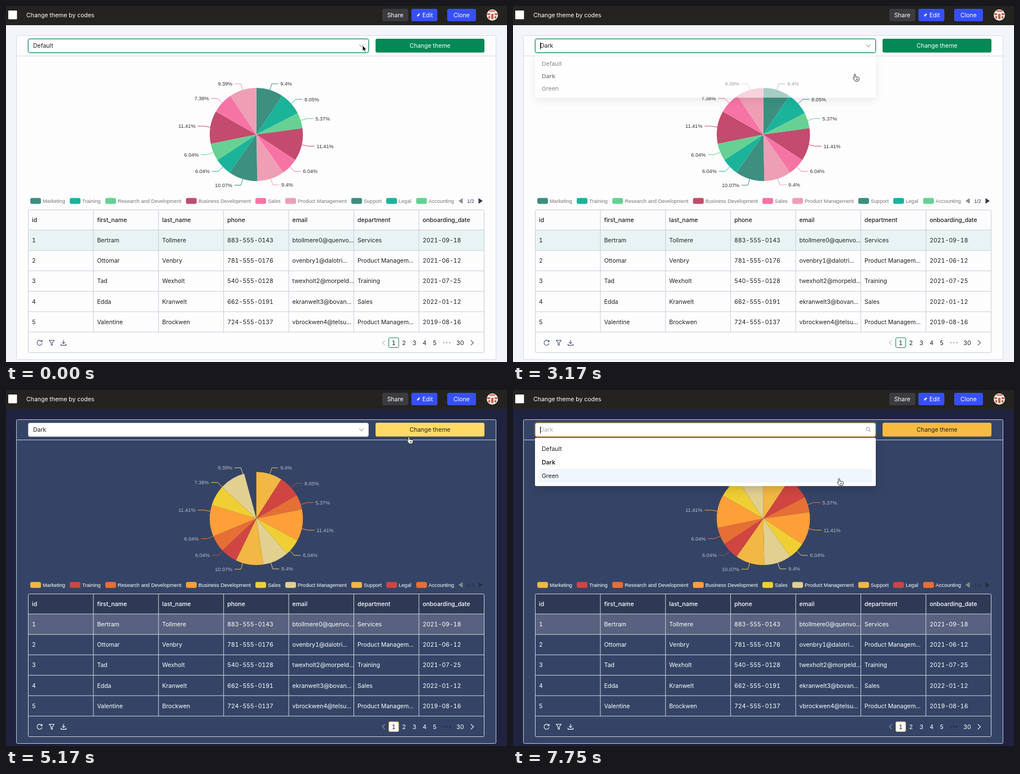
Animation, 888 px wide and 631 px high, one loop 8 s. Source, as an HTML page:

```html
<!DOCTYPE html>
<html lang="en">
<head>
<meta charset="utf-8">
<title>Change theme by codes</title>
<style>
  html, body { margin: 0; width: 100%; height: 100%; overflow: hidden; }
  svg {
    display: block; width: 100vw; height: 100vh;
    --page: #f4f5fb; --panel: #fdfdfe; --edge: #d6d9e9; --grid: #c9cddb; --ink: #222;
    --row: #e8f4f3; --icon: #4a5378; --legend: #777; --label: #333; --pager: #2f3a48;
    --accent: #078a5c; --prev: #c2c4cc; --dots: #a5a8b5;
    --c0: #3d8f7f; --c1: #1cb39b; --c2: #66d193; --c3: #c24b6e; --c4: #f674a5; --c5: #ee9fb5;
  }
  svg.dark {
    --page: #20233f; --panel: #354466; --edge: #c3c8d4; --grid: #cfd3dd; --ink: #fff;
    --row: #58617f; --icon: #fff; --legend: #fff; --label: #b7bbc7; --pager: #28303d;
    --accent: #f0b042; --prev: #878d9d; --dots: #1f2738;
    --c0: #f3b743; --c1: #d04541; --c2: #e66f35; --c3: #ff9f38; --c4: #f0cf34; --c5: #e2d091;
  }
  text { font: 10.5px Inter, sans-serif; font-variant-numeric: tabular-nums; fill: var(--ink); white-space: pre; }
  .chart text { font: 9.1px "Liberation Sans", Arial, sans-serif; fill: var(--label); }
  .chart.legend text { fill: var(--legend); }
  .mid { text-anchor: middle; }
  .end { text-anchor: end; }
  .medium { font-weight: 500; }
  .white { fill: #fff; }
  .black { fill: #222; }
  .line { fill: none; stroke: var(--grid); }
  .icon { fill: none; stroke: var(--icon); stroke-width: 1.1; stroke-linejoin: round; }
  #list rect:first-child { filter: drop-shadow(0 6px 8px rgba(0, 0, 0, .15)); }
</style>
</head>
<body>
<svg id="stage" viewBox="0 0 888 631" preserveAspectRatio="none"></svg>
<script>
const LOOP = 8000, STEP = 1000 / 12;
const PIE = { x: 443.7, y: 227.8, r: 82.5, arm: 11.4 };
const LIST = { top: 84.8, first: 91.7, row: 24.2 };
const shares = [9.4, 8.05, 5.37, 11.41, 6.04, 9.4, 10.07, 6.04, 6.04, 11.41, 7.38, 9.39];
const legend = [[43, 'Marketing'], [113, 'Training'], [176, 'Research and Development'],
  [319, 'Business Development'], [442, 'Sales'], [495, 'Product Management'],
  [612, 'Support'], [674, 'Legal'], [727, 'Accounting']];
const themes = ['Default', 'Dark', 'Green'];
const columns = ['id', 'first_name', 'last_name', 'phone', 'email', 'department', 'onboarding_date'];
const people = [
  ['1', 'Bertram', 'Tollmere', '883-555-0143', 'btollmere0@quenvo...', 'Services', '2021-09-18'],
  ['2', 'Ottomar', 'Venbry', '781-555-0176', 'ovenbry1@dalotri...', 'Product Managem...', '2021-06-12'],
  ['3', 'Tad', 'Wexholt', '540-555-0128', 'twexholt2@morpeld...', 'Training', '2021-07-25'],
  ['4', 'Edda', 'Kranwelt', '662-555-0191', 'ekranwelt3@bovan...', 'Sales', '2022-01-12'],
  ['5', 'Valentine', 'Brockwen', '724-555-0137', 'vbrockwen4@telsu...', 'Product Managem...', '2019-08-16'],
];

// Markup helpers; text is placed by its vertical centre
const text = (x, y, s, cls = '', id = '') => `<text x="${x}" y="${y + 3.8}" class="${cls}" id="${id}">${s}</text>`;
const small = (x, y, s, cls = '') => `<text x="${x}" y="${y + 3.2}" class="${cls}">${s}</text>`;
const rect = (x, y, w, h, fill, r = 0, more = '') =>
  `<rect x="${x}" y="${y}" width="${w}" height="${h}" rx="${r}" fill="${fill}" ${more}/>`;
const path = (d, cls = '', more = '') => `<path d="${d}" class="${cls}" ${more}/>`;
const polar = (turn, r) => [PIE.x + r * Math.sin(turn * 2 * Math.PI), PIE.y - r * Math.cos(turn * 2 * Math.PI)];
const color = i => `var(--c${i % 6})`;

let sum = 0;
const slices = shares.map(share => {
  const from = sum / 100;
  sum += share;
  return { share, from, to: sum / 100 };
});

function topBar() {
  return rect(0, 0, 888, 34, '#242320') + rect(4, 8, 15.5, 15.5, '#fff', 1) +
    text(36, 16, 'Change theme by codes', 'white') +
    rect(667, 5, 46, 22, '#3b3b40', 3) + text(690, 16, 'Share', 'white mid') +
    rect(718.5, 5, 46, 22, '#3650f6', 3) + text(738, 16, 'Edit', 'white') +
    path('M729 18L733 13.8', '', 'stroke="#fff" stroke-width="2.4"') +
    rect(782, 5, 51, 22, '#3650f6', 3) + text(807.5, 16, 'Clone', 'white mid') +
    '<circle cx="862" cy="16" r="10" fill="#f1e8e4"/>' +
    path('M853 13h5v3h-5zM866 13h5v3h-5zM860 14h4v9h-4zM855 18h3v4h-3zM866 18h3v4h-3zM857 8h10v2h-10z', '', 'fill="#c2614c"');
}

function chart() {
  const labels = slices.map(({ share, from, to }, i) => {
    const mid = (from + to) / 2, side = mid < .5 ? 1 : -1;
    const [x, y] = polar(mid, PIE.r + PIE.arm);
    const elbow = x + side * PIE.arm;
    return path(`M${polar(mid, PIE.r)}L${x} ${y}H${elbow}`, '', `fill="none" stroke="${color(i)}"`) +
      small(elbow + side * 3.8, y, share + '%', side < 0 ? 'end' : '');
  });
  const items = legend.map(([x, name], i) =>
    rect(x, 340.2, 19, 10.5, color(i), 3) + small(x + 22, 345.5, name));
  return `<g class="chart"><g id="slices">${slices.map((s, i) => path('', '', `fill="${color(i)}"`)).join('')}</g>` +
    `<g id="labels">${labels.join('')}</g></g><g class="chart legend">${items.join('')}` +
    path('M809.5 340.5V350.5L802 345.5Z', '', 'fill="#8b8b8b"') +
    path('M837.5 340.5V350.5L845 345.5Z', '', 'fill="var(--pager)"') +
    `<text x="823.5" y="348.7" class="mid" style="fill:var(--pager)">1/2</text></g>`;
}

function table() {
  const left = 39.5, width = 115.4, top = 397, high = 36.2;
  let out = rect(left, 361.5, 808, 35.5, 'none', 2, 'id="head"') +
    rect(left, top, 808, high, 'var(--row)') + rect(left, 361.5, 808, 253, 'none', 2, 'class="line"');
  columns.forEach((name, c) => {
    const x = left + c * width;
    out += text(x + 6.5, 379.3, name, 'medium');
    if (c) out += path(`M${x} 361.5V578`, 'line');
    people.forEach((row, r) => out += text(x + 6.5, top + (r + .5) * high, row[c]));
  });
  for (let r = 0; r < 6; r++) out += path(`M${left} ${top + r * high}h808`, 'line');
  out += path('M63.6 594.8A4.5 4.5 0 1 0 64 598M64 592v3h-3', 'icon') +
    path('M76.5 592.5h9l-3.4 4.5v4.6l-2.2-1v-3.6z', 'icon') +
    path('M102 592v6M99.5 595.8l2.5 2.5 2.5-2.5M97.5 598.8v2.6h9v-2.6', 'icon') +
    path('M671.5 592.5l-4.5 4.3 4.5 4.3', '', 'fill="none" stroke="var(--prev)" stroke-width="1.2"') +
    path('M823.8 592.3l4.8 4.5-4.8 4.5', 'icon') +
    rect(678.5, 588, 17.5, 17.5, '#fff', 2, 'stroke="var(--accent)"') + text(687.2, 596.8, '1', 'mid black');
  [[705.5, 2], [724, 3], [742, 4], [760, 5], [805, 30]].forEach(([x, n]) => out += text(x, 596.8, n, 'mid'));
  for (const x of [776, 781.3, 786.6]) out += `<circle cx="${x}" cy="596.8" r="1.3" fill="var(--dots)"/>`;
  return out;
}

function controls() {
  return rect(38.2, 57.2, 605.6, 26.6, 'none', 4, 'id="glow" stroke="var(--accent)" stroke-opacity=".22" stroke-width="1.6"') +
    rect(39.5, 58.5, 603, 24, '#fff', 3, 'id="select"') + text(48, 70.5, '', 'black', 'value') +
    path('M48.5 64.5V77', '', 'id="caret" stroke="#222"') +
    path('M626.3 67.8L630 73L633.7 67.8', '', 'id="chevron" fill="none" stroke="#8f8f8f"') +
    path('M632.2 69.3a3 3 0 1 0-6 0a3 3 0 1 0 6 0M631.4 71.5l2.6 2.6', '', 'id="search" fill="none" stroke="#8a8a8a"') +
    rect(655, 58, 193, 24.6, 'none', 3, 'id="button"') + text(751.5, 70.5, 'Change theme', 'mid', 'caption') +
    `<g id="list">${rect(39, LIST.top, 604, 85.4, '#fff', 2)}${rect(45, 0, 592, LIST.row, '#f0f6fd', 1, 'id="hover"')}` +
    themes.map((name, i) => text(51, LIST.first + (i + .5) * LIST.row, name, 'black', 'option' + i)).join('') + '</g>';
}

const stage = document.getElementById('stage');
stage.innerHTML = rect(0, 0, 888, 631, 'var(--page)') + topBar() +
  rect(18.5, 52.5, 850, 574, 'var(--panel)', 2, 'stroke="var(--edge)"') +
  path('M18.5 88.5h850', '', 'stroke="var(--edge)"') + chart() + table() + controls() +
  '<path id="cursor" stroke-linejoin="round"/>';
const el = id => document.getElementById(id);
const sliceEls = el('slices').children;

// Timing helpers
const clamp = v => Math.min(1, Math.max(0, v));
const ramp = (t, start, length) => clamp((t - start) / length);
const mix = (a, b, p) => a.map((v, i) => v + (b[i] - v) * p);
const rgb = c => `rgb(${c.map(Math.round)})`;
const show = (id, on) => el(id).style.display = on ? '' : 'none';
const cubicInOut = p => p < .5 ? 4 * p ** 3 : 1 - 4 * (1 - p) ** 3;

const green = [3, 137, 86], greenHover = [19, 111, 75], amber = [247, 187, 66], amberHover = [255, 218, 101];
const caretOn = [[170, 1000], [1420, 1920], [2420, 2670], [3000, 3500], [4000, 4250], [6670, 7170], [7750, 8100]];
const track = [[0, 632, 70], [1333, 632, 70], [1417, 612, 94], [2000, 607, 119], [2500, 606, 121], [3170, 606, 121],
  [3980, 714, 83], [5333, 714, 83], [6400, 631, 71], [6920, 631, 71], [7667, 578, 157], [8100, 578, 157]];
const cursors = {
  arrow: ['M0 0V9.8L2.3 7.8 3.8 11.2 5.5 10.4 4 7.2H7Z', '#000', '#fff', .8],
  hand: ['M-1.2 1.2C-1.2-.6 1.2-.6 1.2 1.2V4.4l4.6.9c1.4.3 2 1 1.8 2.4L7 10.2 5.8 12.2H.6L-2.8 7.6c-.8-1.2.4-2 1.6-1.1zM2.6 7.6v2.4M4.4 7.6v2.4', '#fff', '#111', .9],
  beam: ['M-2.5-6.5Q0-6.5 0-5Q0-6.5 2.5-6.5M0-5V5M-2.5 6.5Q0 6.5 0 5Q0 6.5 2.5 6.5M-1.5 1.5h3', 'none', '#111', 1.2],
};

function pointerAt(t) {
  const i = track.findIndex(k => k[0] > t), a = track[i - 1], b = track[i];
  const p = ramp(t, a[0], b[0] - a[0]);
  return mix(a, b, p * p * (3 - 2 * p)).slice(1);
}

function drawPie(t, dark) {
  const grown = dark ? cubicInOut(ramp(t, 4390, 1000)) : 1;
  slices.forEach(({ from, to }, i) => {
    sliceEls[i].setAttribute('d', grown < .001 ? '' :
      `M${PIE.x} ${PIE.y}L${polar(from * grown, PIE.r)}A${PIE.r} ${PIE.r} 0 0 1 ${polar(to * grown, PIE.r)}Z`);
  });
  el('labels').style.opacity = dark ? ramp(t, 4425, 300) : 1;
}

function drawSelect(t, open, [x, y]) {
  const chosen = t < 3000 ? 0 : 1, focus = t < 4250 || t >= 6670;
  const over = x < 643 && y > 58 && y < 83;
  el('value').textContent = themes[chosen];
  el('value').style.fill = open ? '#aaa' : '';
  el('select').setAttribute('stroke', focus || over ? 'var(--accent)' : 'var(--edge)');
  show('glow', focus);
  show('chevron', !open);
  show('search', open);
  show('caret', caretOn.some(([a, b]) => t >= a && t < b));

  const opened = 1 - (1 - ramp(t, t < 4000 ? 390 : 6560, 200)) ** 5;
  const shown = open ? opened : t >= 3000 && t < 4000 ? 1 - ramp(t, 3017, 200) ** 3 : 0;
  show('list', shown > 0);
  el('list').style.opacity = shown;
  el('list').setAttribute('transform', `translate(0 ${LIST.top}) scale(1 ${.8 + .2 * shown}) translate(0 ${-LIST.top})`);
  const hovered = Math.floor((y - LIST.first) / LIST.row);
  show('hover', open && hovered >= 0 && hovered !== chosen);
  el('hover').setAttribute('y', LIST.first + hovered * LIST.row);
  themes.forEach((name, i) => el('option' + i).style.fontWeight = i === chosen ? 600 : 400);
  return shown > 0;
}

function draw(now) {
  const t = Math.floor((now % LOOP + 3.4) / STEP) * STEP + 4;
  const dark = t >= 4400, open = t >= 500 && t < 3000 || t >= 6670;
  const pointer = pointerAt(t), [x, y] = pointer;
  stage.classList.toggle('dark', dark);
  drawPie(t, dark);
  const listed = drawSelect(t, open, pointer);

  el('head').setAttribute('fill', rgb(mix([252, 252, 253], [46, 58, 85], ramp(t, 4365, 300))));
  let fill = mix(green, greenHover, ramp(t, 3840, 200));
  fill = mix(fill, amberHover, ramp(t, 4440, 250));
  el('button').setAttribute('fill', rgb(mix(fill, amber, ramp(t, 5980, 200))));
  el('caption').style.fill = t < 4490 ? '#fff' : '#222';

  const onButton = x > 655 && y < 84;
  const [d, inside, outline, weight] = cursors[onButton || listed && y > 86 ? 'hand' : open ? 'beam' : 'arrow'];
  const cursor = el('cursor');
  cursor.setAttribute('d', d);
  cursor.setAttribute('fill', inside);
  cursor.setAttribute('stroke', outline);
  cursor.setAttribute('stroke-width', weight);
  cursor.setAttribute('transform', `translate(${x} ${y})`);
}

function tick() {
  draw(performance.now());
  requestAnimationFrame(tick);
}
tick();
</script>
</body>
</html>
```
